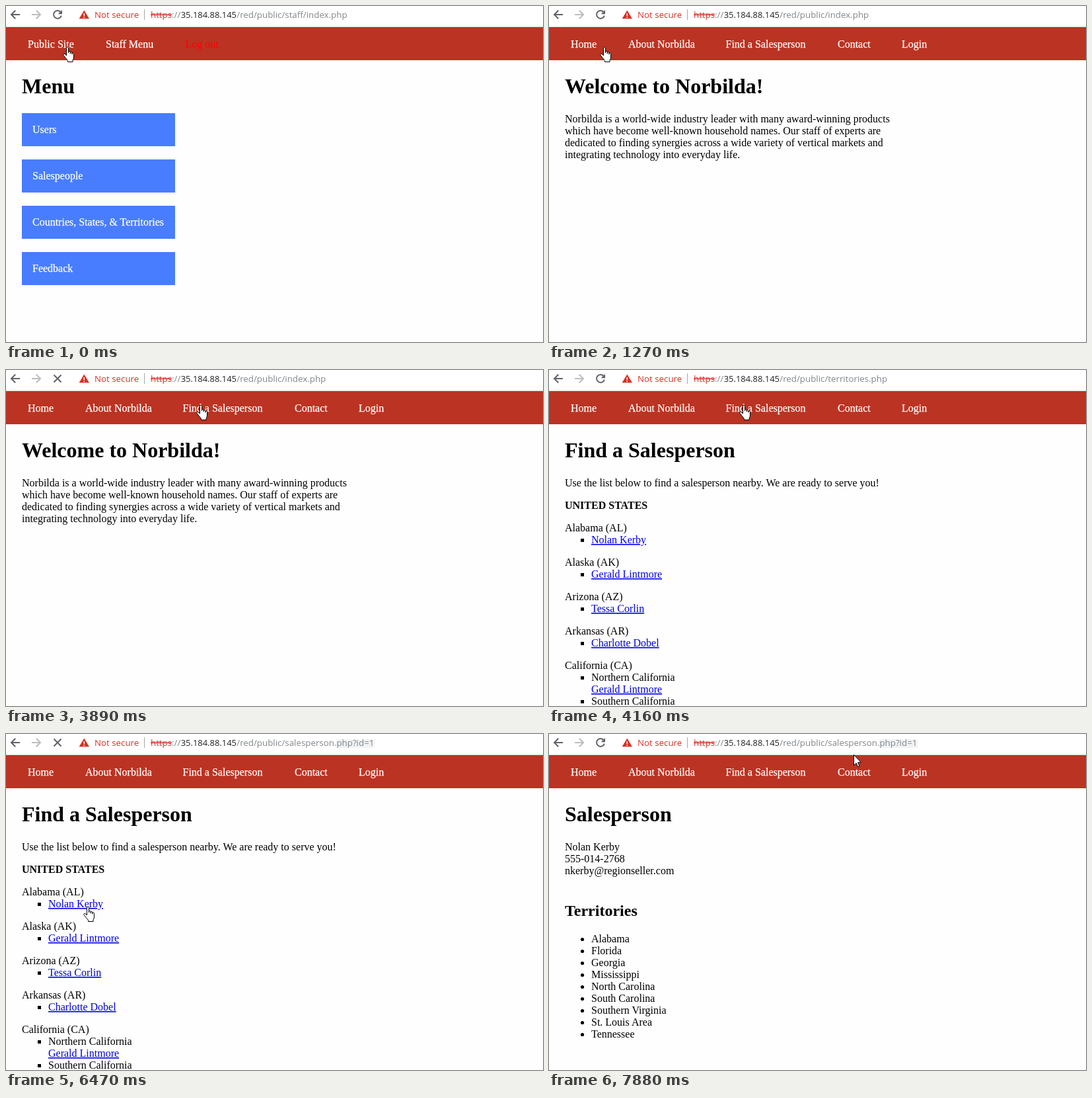
Write an HTML page that moves like this. It is 813x508 px and loops after 8000 ms.

```html
<!DOCTYPE html>
<html lang="en">
<head>
<meta charset="utf-8">
<title>Staff site walkthrough</title>
<style>
  html, body { margin: 0; width: 100%; height: 100%; overflow: hidden; background: #fefefe; }
  svg { display: block; }
  text { font: 16px "Liberation Serif", "Times New Roman", serif; fill: #000; white-space: pre; }
  .h1 { font-size: 32px; font-weight: bold; }
  .h2 { font-size: 24px; font-weight: bold; }
  .bold { font-weight: bold; }
  .light { fill: #fff; stroke: #fff; stroke-width: .25px; }
  .logout { fill: #f00; }
  .link { fill: #00e; text-decoration: underline; }
  .ui { font: 13.32px "Open Sans", "Noto Sans", sans-serif; fill: #80868b; }
  .alert { fill: #d93025; }
  .strike { text-decoration: line-through; }
  .host { font-size: 12.95px; fill: #202124; }
  .icon { fill: none; stroke: #5f6368; stroke-width: 2; }
  .cursor { fill: #fff; stroke: #000; stroke-linejoin: round; }
</style>
</head>
<body>
<svg id="stage" width="813" height="508" viewBox="0 0 813 508">
  <rect width="813" height="508" fill="#fefefe"/>
  <rect width="813" height="31" fill="#fff"/>
  <rect y="31" width="813" height="1" fill="#d5d5d5"/>
  <rect y="32" width="813" height="50" fill="#b32"/>

  <path class="icon" d="M21 13H8.5M14.2 6.8L8 13l6.2 6.2"/>
  <path class="icon" style="stroke:#bbbdbf" d="M39 13h12.5M45.8 6.8L52 13l-6.2 6.2"/>
  <g id="reload">
    <path class="icon" d="M82.6 9A6 6 0 1 0 83.8 14.6"/>
    <path d="M85 6v6.3h-6.3z" fill="#5f6368"/>
  </g>
  <path id="stop" class="icon" d="M72.5 7.5l11 11M83.5 7.5l-11 11"/>
  <path class="alert" d="M118.3 6.5L126 19.3h-15.4z"/>
  <path d="M118.3 11v4M118.3 16.3v1.6" stroke="#fff" stroke-width="1.5"/>
  <path d="M209.5 5v16" stroke="#a5a5a5"/>
  <rect id="shade" x="500" y="8" width="58" height="13" fill="#f1f2f3"/>

  <g id="content"></g>
  <path id="arrow" class="cursor" d="M.5.5V16.5L4.2 13L6.6 18.5L9 17.5L6.6 12H11.5Z"/>
  <path id="hand" class="cursor" d="M5.5 14V2.5A1.5 1.5 0 0 1 8.5 2.5V10V8.5Q8.7 7.2 10 7.4Q11.3 7.6 11.3 9V11V9.5Q11.6 8.2 12.8 8.5Q14 8.8 14 10V12V10.6Q14.4 9.4 15.6 9.9Q16.5 10.3 16.5 11.6V17Q16.5 19 15 21V23.5H7.5V21.5L4 17.3L1 13.3Q.3 12 1.5 11.4Q2.8 11 4 12.2Z"/>
</svg>
<script>
const LOOP = 8000;
const byId = id => document.getElementById(id);
const content = byId("content");

function add(parent, tag, attrs, label) {
  const node = document.createElementNS("http://www.w3.org/2000/svg", tag);
  for (const key in attrs) node.setAttribute(key, attrs[key]);
  if (label) node.textContent = label;
  parent.appendChild(node);
  return node;
}
const group = () => add(content, "g", {});
const write = (parent, x, y, label, cls = "") => add(parent, "text", { x, y, class: cls }, label);
const lines = (parent, x, y, list) => list.forEach((s, i) => write(parent, x, y + 18 * i, s));
const show = (node, on) => node.setAttribute("visibility", on ? "visible" : "hidden");

// Address bar
write(content, 134, 18, "Not secure", "ui alert");
write(content, 219, 18, "https", "ui alert strike");
write(content, 251, 18, "://", "ui");
write(content, 264.7, 18, "35.184.88.145", "ui host");
const path = write(content, 349.3, 18, "", "ui");

// Navigation
const staffNav = group(), publicNav = group();
write(staffNav, 33, 63, "Public Site", "light");
write(staffNav, 151, 63, "Staff Menu", "light");
write(staffNav, 271.5, 63, "Log out", "logout");
[[33, "Home"], [120, "About Norbilda"], [267.5, "Find a Salesperson"], [437, "Contact"], [534, "Login"]]
  .forEach(([x, label]) => write(publicNav, x, 63, label, "light"));

// Staff menu
const menu = group();
write(menu, 24, 132, "Menu", "h1");
["Users", "Salespeople", "Countries, States, & Territories", "Feedback"].forEach((label, i) => {
  const y = 162 + 70 * i;
  add(menu, "rect", { x: 24, y, width: 232, height: 50, fill: "#487dff" });
  write(menu, 40, y + 30, label, "light");
});

// Home
const home = group();
write(home, 24, 132, "Welcome to Norbilda!", "h1");
lines(home, 24, 176, [
  "Norbilda is a world-wide industry leader with many award-winning products",
  "which have become well-known household names. Our staff of experts are",
  "dedicated to finding synergies across a wide variety of vertical markets and",
  "integrating technology into everyday life."
]);

// Territory list
const finder = group();
const square = y => add(finder, "rect", { x: 48, y: y - 7, width: 5, height: 5 });
write(finder, 24, 132, "Find a Salesperson", "h1");
write(finder, 24, 176, "Use the list below to find a salesperson nearby. We are ready to serve you!");
write(finder, 24, 210, "UNITED STATES", "bold");
[["Alabama (AL)", "Nolan Kerby"], ["Alaska (AK)", "Gerald Lintmore"],
 ["Arizona (AZ)", "Tessa Corlin"], ["Arkansas (AR)", "Charlotte Dobel"]].forEach(([state, person], i) => {
  const y = 244 + 52 * i;
  write(finder, 24, y, state);
  square(y + 18);
  write(finder, 64, y + 18, person, "link");
});
write(finder, 24, 452, "California (CA)");
square(470);
write(finder, 64, 470, "Northern California");
write(finder, 64, 488, "Gerald Lintmore", "link");
square(506);
write(finder, 64, 506, "Southern California");

// Salesperson
const person = group();
write(person, 24, 132, "Salesperson", "h1");
lines(person, 24, 176, ["Nolan Kerby", "555-014-2768", "nkerby@regionseller.com"]);
write(person, 24, 275, "Territories", "h2");
const areas = ["Alabama", "Florida", "Georgia", "Mississippi", "North Carolina", "South Carolina",
  "Southern Virginia", "St. Louis Area", "Tennessee"];
lines(person, 64, 315, areas);
areas.forEach((_, i) => add(person, "circle", { cx: 50.5, cy: 310.5 + 18 * i, r: 2.6 }));

// Each list starts with the time from which its entry holds.
const pages = [[0, menu], [1270, home], [4160, finder], [6630, person]];
const paths = [
  [0, "staff/index.php"], [800, "index.php"], [4010, "territories.php"], [6470, "salesperson.php?id=1"]
];
const loading = [[0, false], [680, true], [1270, false], [3890, true], [4160, false], [6320, true], [6630, false]];
const hand = byId("hand"), arrow = byId("arrow");
const pointer = [
  [0, hand, 86, 61], [120, hand, 77, 61],
  [2100, arrow, 152, 72], [2220, arrow, 241, 55], [2370, arrow, 276, 49], [2490, arrow, 288, 47],
  [2640, arrow, 291, 47], [3610, hand, 288, 52],
  [4840, arrow, 232, 104], [4960, arrow, 146, 174], [5090, arrow, 152, 195], [5230, arrow, 163, 206],
  [5510, arrow, 128, 237], [5640, arrow, 119, 246], [5760, hand, 114, 251], [5910, hand, 117, 260],
  [7460, arrow, 147, 259], [7610, arrow, 290, 132], [7730, arrow, 390, 35], [7880, arrow, 461, 31]
];
const at = (list, t) => list.findLast(entry => entry[0] <= t);

function draw(t) {
  const page = at(pages, t)[1];
  pages.forEach(([, node]) => show(node, node === page));
  show(staffNav, page === menu);
  show(publicNav, page !== menu);

  const file = at(paths, t)[1];
  path.textContent = "/red/public/" + file;
  show(byId("shade"), file.includes("?"));

  const busy = at(loading, t)[1];
  show(byId("stop"), busy);
  show(byId("reload"), !busy);

  const [, shape, x, y] = at(pointer, t);
  show(hand, shape === hand);
  show(arrow, shape === arrow);
  shape.setAttribute("transform", `translate(${x} ${y})`);
}

const start = performance.now();
function tick() {
  draw((performance.now() - start) % LOOP);
  requestAnimationFrame(tick);
}
tick();
</script>
</body>
</html>
```
